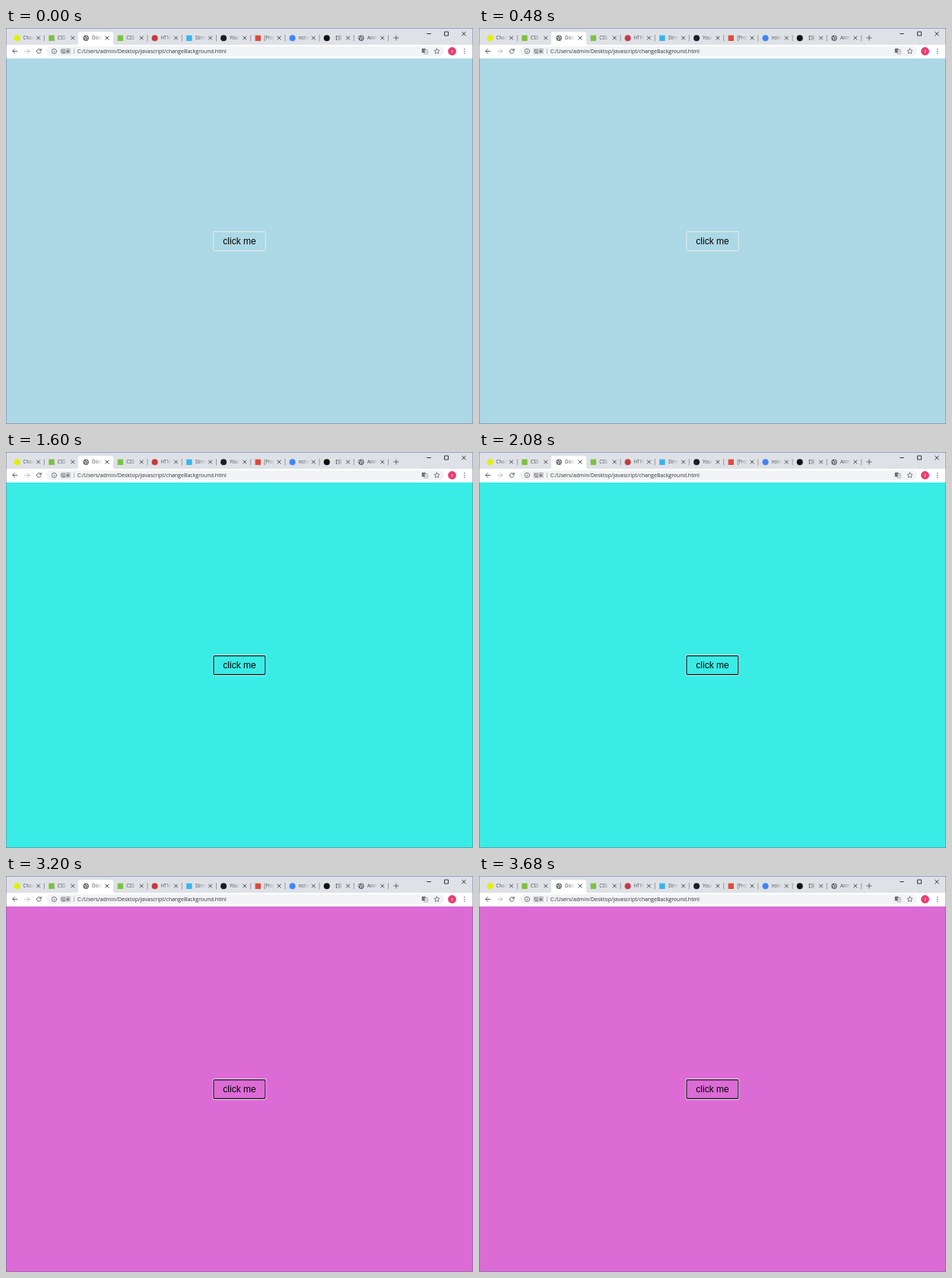
An HTML page for the animation above (4000 ms loop, 614 by 520 pixels).

```html
<!DOCTYPE html>
<html lang="en">
<head>
<meta charset="utf-8">
<title>Change background</title>
<style>
  html, body { margin: 0; width: 100%; height: 100%; overflow: hidden; }
  svg { display: block; width: 614px; height: 520px; }
  text { font-family: "Open Sans", "Noto Sans CJK TC", "Noto Sans CJK", sans-serif; }
  .line { fill: none; stroke: #5f6368; stroke-linecap: round; stroke-linejoin: round; }
  .sharp { fill: none; stroke: #222; stroke-width: .9; }
</style>
</head>
<body>
<svg viewBox="0 0 614 520">
  <defs>
    <linearGradient id="fadeIdle">
      <stop offset="0" stop-color="#dee1e6" stop-opacity="0"/>
      <stop offset="1" stop-color="#dee1e6"/>
    </linearGradient>
    <linearGradient id="fadeActive">
      <stop offset="0" stop-color="#fff" stop-opacity="0"/>
      <stop offset="1" stop-color="#fff"/>
    </linearGradient>
    <clipPath id="titleClip"><rect x="22" y="7" width="14.5" height="13"/></clipPath>
    <g id="globe">
      <circle r="3.7" fill="#5f6368"/>
      <path d="M-2.6-.9 L-.8-.4 L-.2 .8 L-1 2.6 M.4-2.8 L.7-1.3 L2.6-.7 M1 1.1 L2.3 1.2" fill="none" stroke="#fff" stroke-width="1"/>
    </g>
  </defs>

  <rect width="614" height="520" fill="#dee1e6"/>
  <path d="M92 22 Q95 22 95 19 V8 Q95 5 98 5 H138 Q141 5 141 8 V19 Q141 22 144 22 Z" fill="#fff"/>
  <g id="tabs"></g>
  <path class="line" d="M510 13 H516 M513 10 V16" stroke-width="1"/>

  <path class="sharp" d="M553.3 7.5 H558.8 M576.5 5 H581.5 V10 H576.5 Z M599.4 5 L604.6 10.2 M604.6 5 L599.4 10.2"/>

  <rect y="22" width="614" height="18" fill="#fff"/>
  <rect x="53" y="24.3" width="523" height="12.6" rx="6.3" fill="#f1f3f4"/>
  <path class="line" d="M14.8 30.5 H8.8 M11.6 27.6 L8.7 30.5 L11.6 33.4" stroke-width="1"/>
  <path class="line" d="M24.8 30.5 H30.8 M28 27.6 L30.9 30.5 L28 33.4" stroke-width="1" style="stroke:#bfc1c4"/>
  <path class="line" d="M45.6 28.7 A2.9 2.9 0 1 0 46.1 31.2 M46.2 27.3 V29.5 H44" stroke-width="1"/>
  <circle class="line" cx="63.3" cy="30.5" r="3.2" stroke-width=".8"/>
  <path class="line" d="M63.3 30.3 V32.1 M63.3 28.8 V28.9" stroke-width=".8"/>
  <text x="71.5" y="33" font-size="6.8" fill="#5f6368">檔案</text>
  <path d="M89.5 27 V34" stroke="#a5a8ac" stroke-width=".8"/>
  <text x="93.7" y="33" font-size="7" fill="#303236">C:/Users/admin/Desktop/javascript/changeBackground.html</text>

  <rect x="546.8" y="27" width="4.8" height="5.6" rx=".6" fill="#5f6368"/>
  <rect x="550.3" y="28.6" width="4" height="5.4" rx=".4" fill="#f1f3f4" stroke="#777b80" stroke-width=".6"/>
  <path d="M548 30.8 L549.2 28.4 L550.4 30.8 M551.3 30.5 H553.4 M552.3 29.7 V30.5 L551.3 32.6 M551.7 31.2 L553.2 32.6" fill="none" stroke="#a4a7ab" stroke-width=".5"/>
  <path id="star" class="line" stroke-width=".8"/>
  <circle cx="586.5" cy="30.5" r="5.4" fill="#e83e72"/>
  <text x="586.5" y="32.7" font-size="6" fill="#fff" text-anchor="middle">f</text>
  <g fill="#5f6368">
    <circle cx="602.8" cy="27.8" r=".75"/>
    <circle cx="602.8" cy="30.5" r=".75"/>
    <circle cx="602.8" cy="33.2" r=".75"/>
  </g>

  <rect id="page" y="40" width="614" height="480"/>
  <rect id="idle" x="272.8" y="267.5" width="68.4" height="25" rx="1.2" fill="none" stroke="#efefef" stroke-width=".9"/>
  <g id="focus" fill="none">
    <rect x="272.2" y="266.9" width="69.4" height="26.2" rx="1.8" stroke="#fff" stroke-width="1.1"/>
    <rect x="272.9" y="267.6" width="68" height="24.8" rx="1.3" stroke="#101010" stroke-width="1.1"/>
  </g>
  <text x="307" y="284" font-size="12" text-anchor="middle" style="font-family:'Liberation Sans',Arial,sans-serif">click me</text>

  <path d="M0 .4 H614" stroke="#8588bd" stroke-width=".8"/>
  <path d="M.3 0 V519.6 H613.7 V0" fill="none" stroke="#5c6085" stroke-opacity=".75" stroke-width=".7"/>
</svg>
<script>
const $ = id => document.getElementById(id);
const STEP = 800;
const COLORS = ["#add8e6", "#42e765", "#3aece6", "#170055", "#dc6bd6"];
const PITCH = 45.23;

// title, icon shape, icon colour
const TABS = [
  ["Chan", "circle", "#e4f000"],
  ["CSS", "square", "#7cc243"],
  ["Docu", "globe"],
  ["CSS", "square", "#7cc243"],
  ["HTM", "circle", "#c23b40"],
  ["Strin", "square", "#35b5ee"],
  ["Your", "circle", "#1b1f23"],
  ["[Proj", "square", "#e04a3f"],
  ["notes", "circle", "#4285f4"],
  ["【筆", "circle", "#111"],
  ["Anim", "globe"]
];

function icon(shape, color) {
  if (shape === "globe") return '<use href="#globe" x="14.7" y="13.2"/>';
  if (shape === "circle") return `<circle cx="14.7" cy="13.2" r="4" fill="${color}"/>`;
  return `<rect x="11" y="9.6" width="7.4" height="7.4" fill="${color}"/>`;
}

function tab([title, shape, color], i) {
  const active = i === 2;
  const line = i === 1 || active ? "" :
    '<path d="M50.3 9 V17.4" stroke="#85888d" stroke-width=".8"/>';
  return `<g transform="translate(${i * PITCH} 0)">
    ${icon(shape, color)}
    <text x="22.6" y="15.4" font-size="6.2" fill="#484b50" clip-path="url(#titleClip)">${title}</text>
    <rect x="28" y="7" width="8.7" height="13" fill="url(#${active ? "fadeActive" : "fadeIdle"})"/>
    <path class="line" d="M40.4 10.9 L44.6 15.1 M44.6 10.9 L40.4 15.1" stroke-width="1" style="stroke:#45484d"/>
    ${line}</g>`;
}

function starPath(cx, cy, r) {
  const pts = Array.from({ length: 10 }, (_, i) => {
    const a = i * Math.PI / 5 - Math.PI / 2;
    const d = i % 2 ? r * .48 : r;
    return `${cx + d * Math.cos(a)} ${cy + d * Math.sin(a)}`;
  });
  return `M${pts.join("L")}Z`;
}

function draw(ms) {
  const i = Math.floor(ms / STEP) % COLORS.length;
  $("page").setAttribute("fill", COLORS[i]);
  $("idle").setAttribute("visibility", i ? "hidden" : "visible");
  $("focus").setAttribute("visibility", i ? "visible" : "hidden");
}

function tick() {
  draw(performance.now());
  requestAnimationFrame(tick);
}

$("tabs").innerHTML = TABS.map(tab).join("");
$("star").setAttribute("d", starPath(566.5, 30.6, 3.7));
draw(0);
requestAnimationFrame(tick);
</script>
</body>
</html>
```
